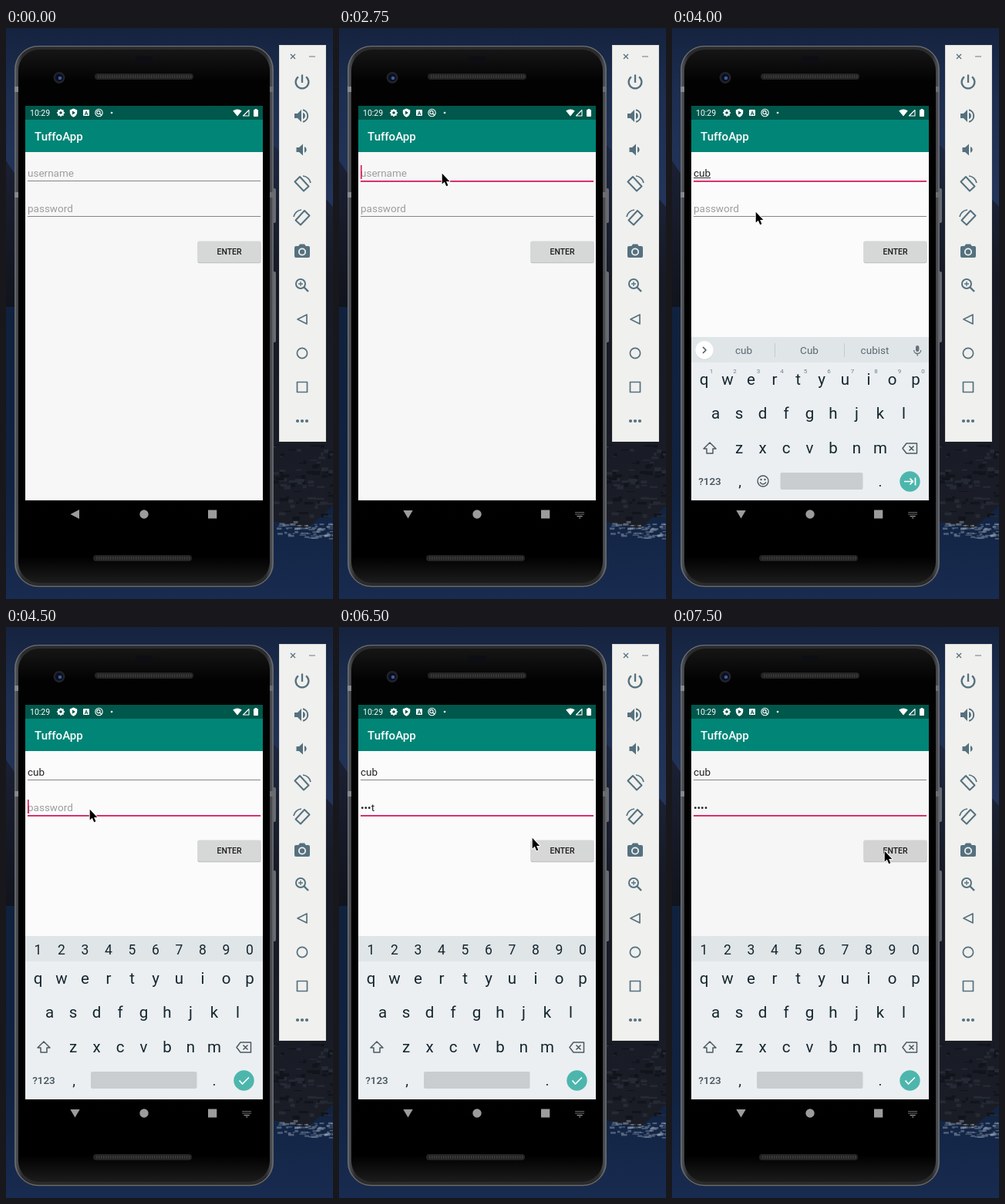
Animation of 424x741 px, one loop 8 s. Source, as an HTML page with a canvas:

```html
<!DOCTYPE html>
<html lang="en">
<head>
<meta charset="utf-8">
<title>Login demo</title>
<style>
html, body { margin: 0; width: 100%; height: 100%; overflow: hidden; background: #14233f; }
canvas { display: block; }
</style>
</head>
<body>
<canvas id="stage" width="424" height="741"></canvas>
<script>
const W = 424, H = 741, LOOP = 8000;
const PINK = '#d81b60', STEEL = '#55717f', KEY = '#16262e', SOFT = '#63727a';
const view = document.getElementById('stage').getContext('2d');
const backdrop = document.createElement('canvas');
backdrop.width = W;
backdrop.height = H;
let g = backdrop.getContext('2d');

// ---- drawing helpers ----
function rect(x, y, w, h, color) {
  g.fillStyle = color;
  g.fillRect(x, y, w, h);
}
function round(x, y, w, h, r, color) {
  g.fillStyle = color;
  g.beginPath();
  g.roundRect(x, y, w, h, r);
  g.fill();
}
function dot(x, y, r, color) {
  g.fillStyle = color;
  g.beginPath();
  g.arc(x, y, r, 0, 7);
  g.fill();
}
function ring(x, y, r, color, width) {
  g.strokeStyle = color;
  g.lineWidth = width;
  g.beginPath();
  g.arc(x, y, r, 0, 7);
  g.stroke();
}
function fillPath(x, y, d, color) {
  g.save();
  g.translate(x, y);
  g.fillStyle = color;
  g.fill(new Path2D(d));
  g.restore();
}
function linePath(x, y, d, color, width) {
  g.save();
  g.translate(x, y);
  g.strokeStyle = color;
  g.lineWidth = width;
  g.lineJoin = 'round';
  g.stroke(new Path2D(d));
  g.restore();
}
function text(s, x, y, size, color, align = 'left', weight = 400) {
  g.font = `${weight} ${size}px Roboto, Arial, sans-serif`;
  g.fillStyle = color;
  g.textAlign = align;
  g.fillText(s, x, y);
  return g.measureText(s).width;
}
function blend(x0, y0, x1, y1, ...stops) {
  const grad = g.createLinearGradient(x0, y0, x1, y1);
  stops.forEach(([at, color]) => grad.addColorStop(at, color));
  return grad;
}

// ---- fixed scenery ----
function drawCoast() {
  rect(0, 0, W, H, blend(0, 0, 0, H,
    [0, '#15233f'], [.12, '#1d2e50'], [.3, '#23355a'], [.5, '#10213e'], [.8, '#10223f'], [1, '#182b50']));
  fillPath(0, 0, 'M0 172L12 190V362H0Z', blend(0, 170, 0, 362, [0, '#1b2033'], [1, '#11141c']));
  fillPath(0, 0, 'M345 150L385 190L424 232V620L390 650L345 640Z',
    blend(0, 150, 0, 640, [0, '#1d2740'], [.35, '#171a25'], [1, '#1a1d26']));
  let seed = 11;
  const rnd = () => (seed = seed * 16807 % 2147483647) / 2147483647;
  for (let i = 0; i < 80; i++) {
    const x = 346 + rnd() * 78, y = 540 + rnd() * 95;
    rect(x, y, 3 + rnd() * 9, 1 + rnd() * 4, rnd() < .5 ? '#252a34' : '#11141b');
  }
  g.globalAlpha = .45;
  for (let i = 0; i < 65; i++) {
    const x = 347 + rnd() * 76;
    rect(x, 634 + rnd() * 22 + (x - 347) * .12, 2 + rnd() * 8, 1 + rnd() * 2, '#9aa7b8');
  }
  g.globalAlpha = 1;
}

function drawPhone() {
  round(345, 208, 5, 45, 2, '#686b70');
  round(345, 316, 5, 92, 2, '#686b70');
  round(11, 23, 336, 703, 31, blend(11, 0, 347, 0, [0, '#55585d'], [.03, '#2a2b2d'], [.97, '#2a2b2d'], [1, '#55585d']));
  g.strokeStyle = '#6d7075';
  g.lineWidth = 1.2;
  g.beginPath();
  g.roundRect(12, 23.6, 334, 701, 30);
  g.stroke();
  round(16, 28, 326, 692, 27, blend(0, 28, 0, 720,
    [0, '#161616'], [.06, '#020202'], [.95, '#000'], [1, '#1c1c1c']));
  for (const y of [76, 213]) {
    rect(11, y, 5, 7, '#85888c');
    rect(342, y, 5, 7, '#6a6d71');
  }
  round(168, 37, 22, 9, 3, '#0d0e14');
  for (const [x, y] of [[115, 59], [113, 684]]) {
    round(x, y, 128, 8, 4, '#242424');
    for (let i = 4; i < 126; i += 3) rect(x + i, y + 2, 1.5, 4, '#3b3b3b');
  }
  dot(69, 64.5, 7.5, '#20232b');
  dot(69, 64.5, 5, '#0b0f1e');
  dot(70, 65, 2.3, '#3b5c9b');
}

function drawToolbar() {
  rect(354, 22, 61, 515, '#dcdcd8');
  rect(355, 23, 59, 513, '#f0f0ee');
  const x = 384, c = STEEL;
  linePath(372, 37, 'M-3 -3L3 3M3 -3L-3 3', c, 1.3);
  linePath(397, 37, 'M-4 0H4', '#87979f', 1.3);
  linePath(x, 70, 'M0 -9.5V1M-5 -6.7A8.4 8.4 0 1 0 5 -6.7', c, 2.3);
  fillPath(x, 114, 'M-10 -3H-6L-1 -8V8L-6 3H-10ZM1 -4.2A4.5 4.5 0 0 1 1 4.2Z', c);
  linePath(x, 114, 'M1 -7.8A8 8 0 0 1 1 7.8', c, 2);
  fillPath(x, 158, 'M-7.5 -3H-4L1 -7.5V7.5L-4 3H-7.5ZM3 -4A4.3 4.3 0 0 1 3 4Z', c);
  for (const [y, flip] of [[202, 1], [246, -1]]) {
    g.save();
    g.translate(x, y);
    g.scale(flip, 1);
    linePath(0, 0, 'M-9.5 -2.5L-3 -9L8.5 3.5L2 9.5Z', c, 2);
    linePath(0, 0, 'M1 -10A11 11 0 0 1 11 -1', c, 1.7);
    g.restore();
  }
  round(374, 283, 20, 15, 2, c);
  fillPath(x, 290, 'M-5.5 -6L-3 -9.5H3L5.5 -6Z', c);
  dot(x, 290.5, 5, '#f0f0ee');
  dot(x, 290.5, 3.2, c);
  ring(382, 332, 6, c, 2);
  linePath(382, 332, 'M4 4L10 10', c, 2.4);
  linePath(382, 332, 'M-3 0H3M0 -3V3', c, 1.3);
  linePath(x, 378, 'M6 -6V6L-6 0Z', c, 1.7);
  ring(x, 422, 6.6, c, 1.7);
  linePath(x, 466, 'M-6.5 -6.5H6.5V6.5H-6.5Z', c, 1.7);
  for (const d of [-6, 0, 6]) dot(x + d, 510, 2.1, c);
}

function drawBars() {
  rect(25, 101, 308, 18, '#00574b');
  rect(25, 119, 308, 42, '#008577');
  text('10:29', 31, 114, 10.5, '#fff');
  ring(71, 110, 2.9, '#fff', 2.2);
  for (let i = 0; i < 8; i++) {
    const a = i * Math.PI / 4;
    dot(71 + 4.2 * Math.cos(a), 110 + 4.2 * Math.sin(a), .9, '#fff');
  }
  fillPath(87.5, 110, 'M0 -5.5L4.7 -3.5V0Q4 4 0 5.7Q-4 4 -4.7 0V-3.5Z', '#fff');
  fillPath(87.5, 110, 'M-1.5 -2.5L2.5 0L-1.5 2.5Z', '#00574b');
  round(100, 106, 8, 8, 1, '#fff');
  text('A', 104, 112.7, 7, '#00574b', 'center', 700);
  ring(120.5, 110, 4.7, '#fff', 1.1);
  ring(120, 109.5, 2.1, '#fff', 1.1);
  linePath(120, 109.5, 'M1.5 1.5L4 4', '#fff', 1.2);
  dot(137, 110, 1.3, '#fff');
  fillPath(300, 114.5, 'M0 0L-5.8 -7Q0 -11.2 5.8 -7Z', '#fff');
  linePath(311, 114, 'M-3.5 0H4V-7.5Z', '#fff', 1.1);
  rect(322.7, 105, 2.6, 2, '#fff');
  round(321, 106, 6, 9, 1, '#fff');
  text('TuffoApp', 37, 146, 15, '#fff', 'left', 500);
}

// ---- changing parts ----
function drawField(y, value, hint, focus, caret, underline) {
  const shown = value || hint;
  const w = text(shown, 28, y + 4.5, 13.5, value ? '#222' : '#9d9d9d');
  if (underline) rect(28, y + 6, w, 1, '#333');
  if (focus) rect(28, y + 10, 302, 1.8, PINK);
  else rect(28, y + 10, 302, 1, '#858585');
  if (caret) rect(28 + (value ? w : 0), y - 10, 1.6, 18, PINK);
}

function drawButton(color) {
  round(248.5, 277, 82, 28.2, 2, '#c3c3c3');
  round(248.5, 276.5, 82, 27.5, 2, color);
  text('ENTER', 289.5, 294.2, 10.5, '#1c1c1c', 'center', 500);
}

function drawMic() {
  round(316, 412, 4.4, 8, 2.2, SOFT);
  linePath(318.2, 418, 'M-4.5 0A4.5 4.5 0 0 0 4.5 0M0 4.5V7.5', SOFT, 1.3);
}

function drawTools() {
  dot(42, 419, 12, '#d3d8db');
  dot(42, 418.3, 11.7, '#fff');
  linePath(42, 418.5, 'M2 -4L-2 0L2 4', '#48555c', 1.5);
  ring(82.5, 417, 4.2, SOFT, 1.6);
  linePath(82.5, 417, 'M3 3L8 8', SOFT, 1.8);
  linePath(128.5, 418.5, 'M-5.5 -5.5H5.5V2L2 5.5H-5.5ZM5.5 2H2V5.5M-3 0Q0 4 3 0', SOFT, 1.3);
  dot(126.3, 416.3, 1, SOFT);
  dot(130.7, 416.3, 1, SOFT);
  text('GIF', 173, 422.5, 10.5, SOFT, 'center', 900);
  round(213.5, 412.5, 11, 12, 1, SOFT);
  rect(246, 410, 1, 17, '#c5cbcf');
  for (const d of [-5, 0, 5]) dot(274 + d, 418.7, 1.5, SOFT);
  drawMic();
}

function drawWords(words) {
  dot(42, 418.7, 12, '#d3d8db');
  dot(42, 418, 11.7, '#fff');
  linePath(42, 418, 'M-2 -4L2 0L-2 4', '#48555c', 1.5);
  words.forEach((word, i) => text(word, 93 + i * 85, 423, 13.5, '#5c6a72', 'center'));
  rect(133, 409, 1, 18, '#c5cbcf');
  rect(223, 409, 1, 18, '#c5cbcf');
  drawMic();
}

function drawKeyboard(secret, words, drop) {
  g.save();
  g.translate(0, drop);
  rect(25, 401, 308, 212, '#ebeff2');
  rect(25, 401, 308, 33, '#e0e5e8');
  const col = i => 41.5 + i * 30.5;
  [...'1234567890'].forEach((n, i) => {
    if (secret) text(n, col(i), 425, 17.5, KEY, 'center');
    else text(n, col(i) + 9.5, 448, 8, '#747f85', 'center');
  });
  if (!secret) words ? drawWords(words) : drawTools();
  [['qwertyuiop', 41.5, 462.5], ['asdfghjkl', 56.5, 507], ['zxcvbnm', 87, 551.5]].forEach(([keys, x, y]) =>
    [...keys].forEach((k, i) => text(k, x + i * 30.5, y, 20.5, KEY, 'center')));
  linePath(49, 545.5, 'M0 -7.5L8 .5H4V6.5H-4V.5H-8Z', '#4c5960', 1.5);
  linePath(308.5, 545.5, 'M-9.5 0L-4.5 -6.5H9V6.5H-4.5ZM-1 -3L5 3M5 -3L-1 3', '#4c5960', 1.5);
  text('?123', 49, 593, 13.5, '#43515a', 'center', 500);
  text(',', 88, 595, 19, KEY, 'center');
  text('.', 270, 595, 19, KEY, 'center');
  const left = secret ? 110 : 140.5;
  round(left, 577, 247.5 - left, 22, 2, '#c9cdd0');
  if (!secret) {
    ring(118, 588, 7, '#4c5960', 1.4);
    dot(115.5, 586, 1.2, '#4c5960');
    dot(120.5, 586, 1.2, '#4c5960');
    linePath(118, 588, 'M-4 1.5Q0 6.5 4 1.5', '#4c5960', 1.4);
  }
  dot(308.5, 588.5, 13.2, '#4db6ac');
  linePath(308.5, 588.5, secret ? 'M-6 0L-2 4.5L6.5 -4' : 'M-7.5 0H4M0 -4L4 0L0 4M7 -5V5', '#fff', 1.7);
  g.restore();
}

function drawNav(typing) {
  const c = '#9c9c9c';
  fillPath(89.5, 631, typing ? 'M-6.2 -5H6.2L0 5.5Z' : 'M5.5 -6V6L-6 0Z', c);
  dot(179, 631, 5.7, c);
  rect(262, 625.5, 11.3, 11, c);
  if (!typing) return;
  for (let i = 0; i < 6; i++) {
    rect(306.5 + i * 2, 628, 1.2, 1.2, c);
    rect(306.5 + i * 2, 630.5, 1.2, 1.2, c);
  }
  rect(308.5, 633, 7.2, 1.2, c);
  rect(311, 635.4, 2.5, 1, c);
}

// Last entry of [time, value] pairs whose time has passed
const at = (track, t) => track.reduce((v, [time, next]) => t >= time ? next : v, track[0][1]);

const pointer = [[0, null], [500, [397, 112]], [750, [389, 111]], [1000, [161, 156]], [1250, [133, 188]],
  [3750, [116, 225]], [4000, [108, 238]], [4250, [108, 236]], [6250, [193, 260]], [6500, [250, 273]], [6750, [275, 290]]];
const user = [[0, ''], [3250, 'cu'], [3500, 'cub']];
const pass = [[0, ''], [5250, 't'], [5500, '•e'], [5750, '••s'], [6000, '•••t'], [7500, '••••']];
const hints = [[0, null], [3250, ['cu', 'Cu', 'cup']], [3500, ['cub', 'Cub', 'cubist']]];
const userCaret = [[0, 0], [2500, 1], [3000, 0], [3250, 1], [4000, 0]];
const passCaret = [[0, 0], [4500, 1], [5000, 0], [5250, 1], [6500, 0], [7000, 1], [7500, 0]];
const paper = [[0, '#f7f7f7'], [3000, '#fbfbfb'], [7500, '#f6f6f6']];
const button = [[0, '#d6d7d7'], [7000, '#c9caca'], [7250, '#d3d3d3']];

function frame(now) {
  const t = now % LOOP;
  g = view;
  g.drawImage(backdrop, 0, 0);
  rect(25, 161, 308, 452, at(paper, t));
  drawField(188, at(user, t), 'username', t >= 2500 && t < 4500, at(userCaret, t), t >= 3250 && t < 4500);
  drawField(234, at(pass, t), 'password', t >= 4250, at(passCaret, t), false);
  drawButton(at(button, t));
  if (t >= 3000) drawKeyboard(t >= 4500, at(hints, t), t < 3250 ? 1 : 0);
  drawNav(t >= 2750);
  const tip = at(pointer, t);
  if (tip) {
    const arrow = 'M.7 .7V14.5L3.8 11.7L6.2 17.3L8.4 16.3L6.1 10.9H10.3Z';
    linePath(...tip, arrow, '#fff', 1.8);
    fillPath(...tip, arrow, '#000');
  }
  requestAnimationFrame(frame);
}

drawCoast();
drawPhone();
drawToolbar();
drawBars();
requestAnimationFrame(frame);
</script>
</body>
</html>
```
